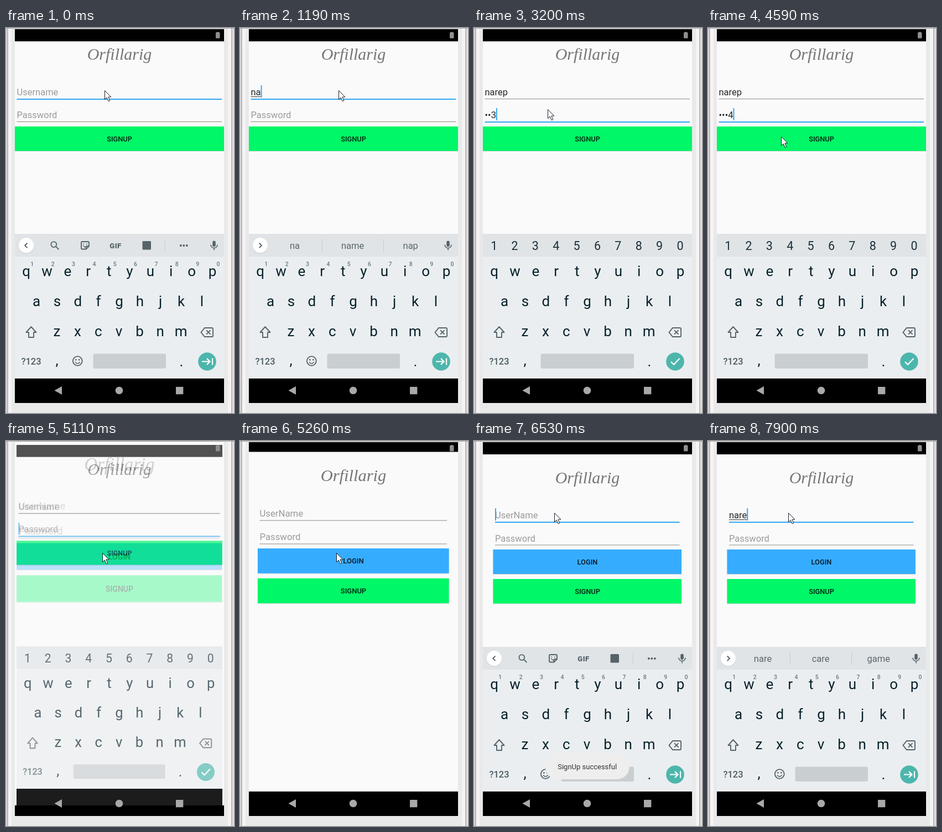
Write an HTML page that moves like this. It is 412x692 px and loops after 8000 ms.

```html
<!DOCTYPE html>
<html lang="en">
<head>
<meta charset="utf-8">
<title>Sign-up screen</title>
<style>
html, body { margin: 0; width: 100%; height: 100%; overflow: hidden; background: #e9e9ea; }
svg { display: block; width: 412px; height: 692px; font-family: Roboto, sans-serif; }
.field { font-size: 16.5px; fill: #262626; }
.hint { font-size: 16.5px; fill: #9b9b9b; }
.button { font-size: 12.8px; font-weight: 500; fill: #000; fill-opacity: .87; }
.logo { font: italic 30px 'Liberation Serif', serif; fill: #757575; }
.key { font-size: 26px; fill: #06212b; }
.digit { font-size: 21.5px; fill: #1b2f38; }
.mini { font-size: 10.5px; font-weight: 500; fill: #6b7880; }
.word { font-size: 16.5px; fill: #5a666c; }
.mode { font-size: 16.5px; font-weight: 500; fill: #4b5a62; }
.icon { fill: none; stroke: #55636a; stroke-width: 1.9; }
</style>
</head>
<body>
<svg id="stage" viewBox="0 0 412 692"></svg>
<script>
const LOOP = 8000, BLUE = '#33a8f4', GREEN = '#00f767', GREY = '#55636a';
const BRAND = 'Orfillarig', USER = 'narep';
const stage = document.getElementById('stage');
const pen = document.createElement('canvas').getContext('2d');

// Step tables: each row is [start time, ...values held until the next row]
const nameLength = [[0, 0], [1040, 1], [1190, 2], [1340, 3], [1490, 4], [2060, 5], [4960, 0],
  [7300, 1], [7450, 2], [7600, 3], [7900, 4]];
const password = [[0, ''], [2900, '1'], [3050, '•2'], [3200, '••3'], [3500, '•••4'], [4960, '']];
const caretOn = [[0, 0], [300, 1], [760, 0], [1040, 1], [3930, 0], [4470, 1], [7000, 0], [7300, 1]];
const pointer = [[0, 178, 112], [2200, 165, 124], [2340, 143, 141], [2480, 133, 146], [3500, 133, 147],
  [3780, 133, 148], [3930, 133, 150], [4210, 132, 156], [4340, 131, 170], [4470, 131, 184],
  [4590, 132, 195], [4960, 160, 201], [5110, 174, 201], [5530, 177, 199], [5680, 180, 195],
  [5800, 168, 164], [5930, 145, 129]];
const focused = [[0, 'name'], [2630, 'password'], [5260, ''], [6230, 'name']];
const toastAlpha = [[0, 0], [5400, .5], [5530, 1], [7000, .6], [7150, 0]];
const keyboardDrop = [[0, 0], [5260, 260], [6230, 170], [6380, 40], [6530, 0]];
const loginView = [[0, 0, 1], [5110, .32, 1.09], [5260, 1, 1.015], [5400, 1, 1]];
const suggestions = [[], ['n', 'not', 'now'], ['na', 'name', 'nap'], ['nar', 'near', 'bar'],
  ['nare', 'care', 'game'], [USER, 'Taper', 'parents']];

const at = (steps, t) => steps.filter(s => s[0] <= t).pop().slice(1);
const rect = (x, y, w, h, fill, more = '') =>
  `<rect x="${x}" y="${y}" width="${w}" height="${h}" fill="${fill}" ${more}/>`;
const circle = (x, y, r, fill, more = '') => `<circle cx="${x}" cy="${y}" r="${r}" fill="${fill}" ${more}/>`;
const text = (x, y, kind, s, anchor = 'middle') =>
  `<text x="${x}" y="${y}" class="${kind}" text-anchor="${anchor}">${s}</text>`;
const icon = (d, more = '') => `<path class="icon" d="${d}" ${more}/>`;
const zoom = (scale, cy) => `transform="translate(205 ${cy}) scale(${scale}) translate(-205 ${-cy})"`;

function textWidth(s) {
  pen.font = '16.5px Roboto, sans-serif';
  return pen.measureText(s).width;
}

function field(x, y, right, hint, value, active, caret, underline) {
  const w = textWidth(value);
  return (value ? text(x, y, 'field', value, 'start') : text(x, y, 'hint', hint, 'start')) +
    (underline && value ? rect(x, y + 2, w, 1, '#333') : '') +
    (active ? rect(x, y + 6, right - x, 2, BLUE) : rect(x, y + 6, right - x, 1, '#8b8b8b')) +
    (active && caret ? rect(x + w, y - 18, 2, 22, BLUE) : '');
}

function button(x, y, w, fill, label) {
  return rect(x, y + 1, w, 44, '#000', 'opacity=".15"') + rect(x, y, w, 44, fill) +
    text(205, y + 27, 'button', label);
}

const page = (logoY, content) => rect(16, 2, 378, 672, '#fafafa') + rect(16, 2, 378, 22, '#000') +
  text(205, logoY, 'logo', BRAND) + content;

const signupPage = s => page(57,
  field(19.5, 121, 390, 'Username', s.name, s.focus == 'name', s.caret, s.composing) +
  field(19.5, 162, 390, 'Password', s.pass, s.focus == 'password', s.caret) +
  button(16, 177, 378, GREEN, 'SIGNUP'));

const loginPage = s => page(75.5,
  field(38, 139, 371.5, 'UserName', s.name, s.focus == 'name', s.caret, true) +
  field(38, 180.5, 371.5, 'Password', '', false) +
  button(34.5, 195, 340.5, '#36acff', 'LOGIN') +
  button(34.5, 248, 340.5, GREEN, 'SIGNUP'));

const row = (letters, x, y, kind) =>
  [...letters].map((c, i) => text(x + i * 37.36, y, kind, c)).join('');

const mic = rect(373.2, 382.5, 5.6, 10.5, GREY, 'rx="2.8"') +
  icon('M370 389.5a6 6 0 0 0 12 0M376 395.5v4', 'style="stroke-width:1.6"');

const roundKey = arrow => circle(36.5, 391.5, 14, '#000', 'opacity=".12"') +
  circle(36.5, 390.7, 13.7, '#fff') + icon(arrow);

const tools = roundKey('M38.5 386.5l-4.3 4.3 4.3 4.3') +
  circle(86.3, 389, 4.9, 'none', `stroke="${GREY}" stroke-width="1.9"`) + icon('M90 392.7l5.3 5.3') +
  icon('M138 384h10q2 0 2 2v6l-5.500 5.500h-6.500q-2 0-2-2v-9.500q0-2 2-2zM150 392h-3.500q-2 0-2 2v3.500') +
  icon('M139.500 391q2 3.500 5 2.500M140.200 387.500v1.800M146 387.500v1.800', 'style="stroke-width:1.5"') +
  `<text x="198" y="395.500" font-size="13" font-weight="900" fill="${GREY}" text-anchor="middle" letter-spacing=".5">GIF</text>` +
  rect(246.500, 383, 15.500, 15.500, GREY, 'rx="1.500"') + rect(287, 381, 1, 20, '#c7cdd1') +
  [315.8, 321.3, 326.8].map(x => circle(x, 391, 1.9, GREY)).join('') + mic;

const wordBar = words => roundKey('M34.700 386.500l4.300 4.300-4.300 4.300') +
  words.map((w, i) => text(99 + i * 104.6, 397, 'word', w)).join('') +
  rect(148, 380, 1, 22, '#c7cdd1') + rect(259, 380, 1, 22, '#c7cdd1') + mic;

const keys = row('qwertyuiop', 36.7, 446, 'key') + row('asdfghjkl', 55, 500, 'key') +
  row('zxcvbnm', 92, 554, 'key') + text(92, 606, 'key', ',') + text(317, 608, 'key', '.') +
  text(45.5, 605, 'mode', '?123') +
  icon('M45.500 537l9 10h-4.500v9h-9v-9h-4.500z', 'stroke-linejoin="round"') +
  icon('M359 539h13q2 0 2 2v12q0 2-2 2h-13l-6.500-8zM362 543.200l7.500 7.500m0-7.500l-7.500 7.500');

function keyboard(s) {
  const secret = s.focus == 'password';
  const bar = secret ? row('1234567890', 36.2, 399, 'digit')
    : s.name ? wordBar(suggestions[s.name.length]) : tools;
  const smiley = circle(129.3, 598.5, 8.400, 'none', `stroke="${GREY}" stroke-width="1.9"`) +
    circle(126.3, 596.3, 1.4, GREY) + circle(132.3, 596.3, 1.4, GREY) +
    icon('M125 600.500q4.300 5.500 8.600 0', 'style="stroke-width:1.600"');
  const spaceX = secret ? 120.5 : 157.5;
  const action = secret ? 'M356 600l5 5 10.500-11' : 'M354 599.500h14.500m-5.500-5.500l5.500 5.500-5.500 5.500M373 593.500v12';
  return rect(16, 370, 378, 260, '#ebeef0') + rect(16, 370, 378, 41, '#e0e4e7') + bar + keys +
    (secret ? '' : row('1234567890', 47.3, 428, 'mini') + smiley) +
    rect(spaceX, 585.5, 289 - spaceX, 26.5, '#c9ced1', 'rx="3"') +
    circle(363.5, 599.5, 16.3, '#4db6ac') + icon(action, 'style="stroke:#fff;stroke-width:2.2"');
}

const toast = alpha => `<g opacity="${alpha}">` + rect(129, 562, 151.5, 46, '#eeeeee', 'rx="22"') +
  `<text x="204.700" y="590" font-size="13" fill="#333" text-anchor="middle">SignUp successful</text></g>`;

const bezel = rect(0, 0, 412, 692, '#e9e9ea') + rect(4, 0, 6, 692, '#f4f4f5') + rect(401, 0, 6, 692, '#f4f4f5') +
  rect(0, 0, 2, 692, '#dcd7d9') + rect(2, 0, 2, 692, '#bbb4b7') +
  rect(407, 0, 2, 692, '#bbb4b7') + rect(409, 0, 3, 692, '#e4dfe1') + rect(0, 0, 412, 1, '#a9a5a7') +
  rect(16, 2, 378, 672, '#fafafa');

const systemIcons = rect(379, 8, 7.5, 10.5, '#8e8e8e', 'rx=".8"') + rect(381, 7, 3.5, 1.5, '#8e8e8e') +
  '<path d="M87.500 651.500L101 644v15z" fill="#a9a9a9"/>' +
  circle(204.5, 651.5, 6.8, '#a9a9a9') + rect(307, 645, 13.3, 13.3, '#a9a9a9');

function draw(t) {
  const [alpha, scale] = at(loginView, t), [drop] = at(keyboardDrop, t), [px, py] = at(pointer, t);
  const s = {
    name: USER.slice(0, at(nameLength, t)[0]), pass: at(password, t)[0],
    focus: at(focused, t)[0], caret: at(caretOn, t)[0], composing: t < 2480
  };
  const blending = alpha > 0 && alpha < 1;
  const board = drop < 260 ? `<g clip-path="url(#content)"><g transform="translate(0 ${drop})">${keyboard(s)}</g></g>` : '';
  const oldView = alpha < 1 ? `<g ${zoom(blending ? .984 : 1, 318)}>${signupPage(s)}${board}</g>` : '';
  const loginState = blending ? { name: '', focus: '' } : s;
  const newView = alpha ? `<g opacity="${alpha}"><g ${zoom(scale, 322)}>${loginPage(loginState)}</g></g>` : '';
  const nav = blending ? rect(19, 625, 372, 30, '#1c1c1c') + rect(16, 655, 378, 19, '#000')
    : rect(16, 630, 378, 44, '#000');
  return '<clipPath id="screen"><rect x="16" y="2" width="378" height="672"/></clipPath>' +
    '<clipPath id="content"><rect x="16" y="24" width="378" height="606"/></clipPath>' +
    bezel + `<g clip-path="url(#screen)">${oldView}${newView}${alpha == 1 ? board : ''}` +
    nav + systemIcons + toast(at(toastAlpha, t)[0]) + '</g>' +
    `<path transform="translate(${px + .5} ${py + .5})" d="M0 0v16l3.700-3.500 3 6.700 2.600-1.100-2.900-6.600h5z" fill="#fff" stroke="#1c1c28"/>`;
}

let shown = '';
function tick() {
  const picture = draw(performance.now() % LOOP);
  if (picture != shown) stage.innerHTML = shown = picture;
  requestAnimationFrame(tick);
}
tick();
</script>
</body>
</html>
```
